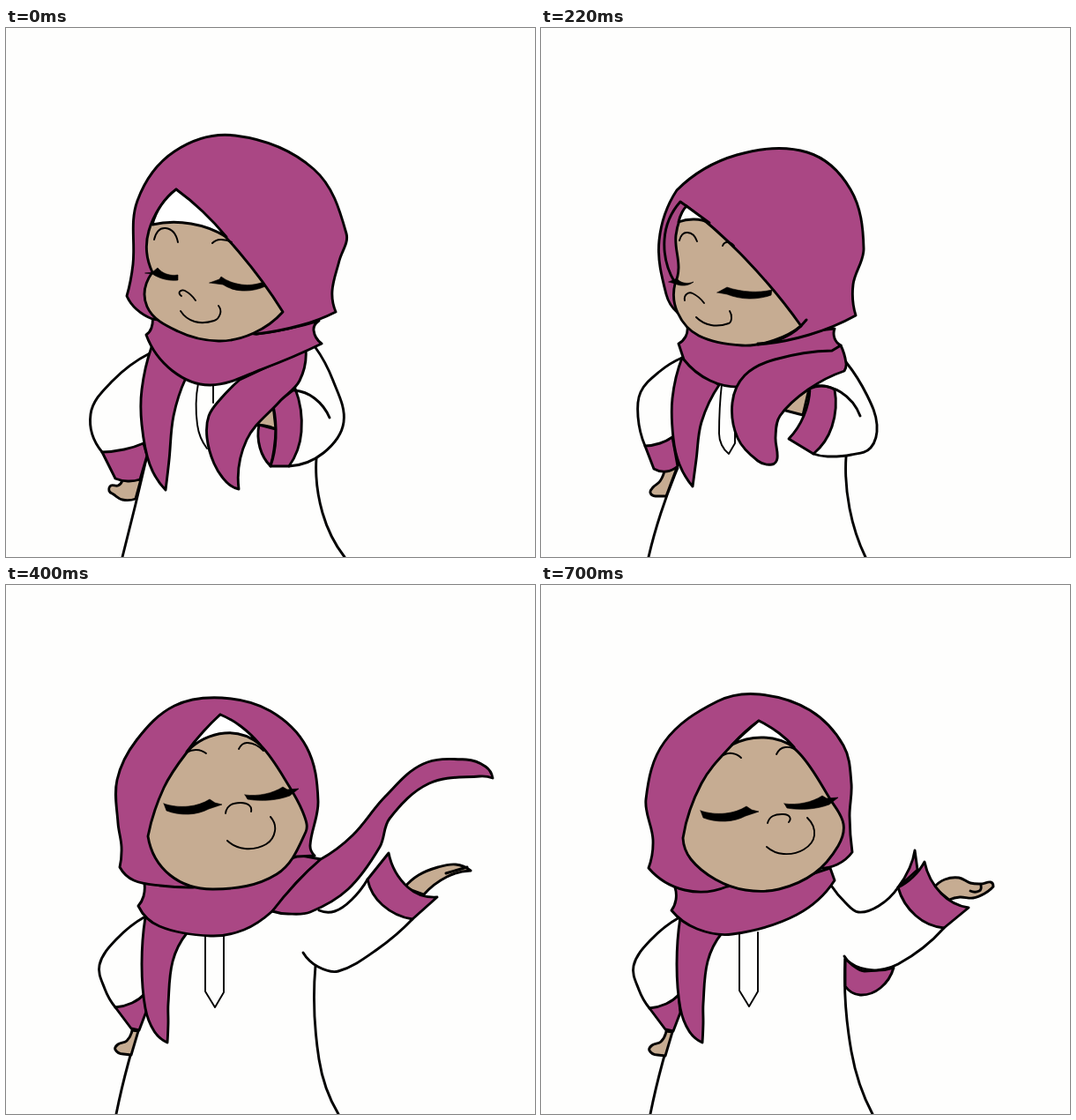
An HTML page that plays this animation: 600x600 px, repeating every 0.8 s.

```html
<!DOCTYPE html>
<html lang="en">
<head>
<meta charset="utf-8">
<title>Waving scarf</title>
<style>
html, body { margin: 0; width: 100%; height: 100%; overflow: hidden; background: #fefefd; }
svg { display: block; width: 100vw; height: 100vh; }
path { stroke: #000; stroke-width: 2.9; stroke-linejoin: round; stroke-linecap: round; fill: none; }
.cloth { fill: #aa4784; }
.skin { fill: #c6ac92; }
.white { fill: #fff; }
.fine { stroke-width: 1.9; }
.ink { fill: #000; stroke-width: .6; }
</style>
</head>
<body>
<svg id="stage" viewBox="0 0 600 600"></svg>
<script>
const NS = 'http://www.w3.org/2000/svg';
const stage = document.getElementById('stage');
let layer;

// Smooth curve through the points; "!" marks a corner.
function curve(text, closed, dx, dy) {
  const pts = text.split(' ').map(s => {
    const [x, y] = s.replace('!', '').split(',').map(Number);
    return { x: x + dx, y: y + dy, sharp: s.endsWith('!') };
  });
  const n = pts.length;
  if (!closed) pts[0].sharp = pts[n - 1].sharp = true;
  const handle = (i, len) => {
    const a = pts[(i + n - 1) % n], b = pts[(i + 1) % n], p = pts[i];
    const k = len * .35 / (Math.hypot(b.x - a.x, b.y - a.y) || 1);
    return { x: p.x + (b.x - a.x) * k, y: p.y + (b.y - a.y) * k };
  };
  let d = `M${pts[0].x} ${pts[0].y}`;
  for (let i = 0; i < (closed ? n : n - 1); i++) {
    const j = (i + 1) % n, p = pts[i], q = pts[j];
    const vx = q.x - p.x, vy = q.y - p.y, len = Math.hypot(vx, vy);
    let c1 = p.sharp ? null : handle(i, len);
    let c2 = q.sharp ? null : handle(j, -len);
    if (!c1 && !c2) { d += `L${q.x} ${q.y}`; continue; }
    c1 = c1 || { x: c2.x - vx / 3, y: c2.y - vy / 3 };
    c2 = c2 || { x: c1.x + vx / 3, y: c1.y + vy / 3 };
    d += `C${c1.x} ${c1.y} ${c2.x} ${c2.y} ${q.x} ${q.y}`;
  }
  return closed ? d + 'Z' : d;
}

const pen = (kind, closed) => (text, dx = 0, dy = 0) => {
  const path = document.createElementNS(NS, 'path');
  path.setAttribute('class', kind);
  path.setAttribute('d', curve(text, closed, dx, dy));
  layer.appendChild(path);
};
const cloth = pen('cloth', true), skin = pen('skin', true), white = pen('white', true);
const ink = pen('ink', true), line = pen('line', false), fine = pen('fine', false);

function bow() {
  line('160,485 147,540 132,600');
  line('352,488 359,550 384,600');
  skin('132,513! 127,519 119,519 117,525 122,529 132,535 147,534! 153,512!');
  cloth('109,481! 134,478 156,471! 160,485! 152,512! 138,514 124,511!');
  line('163,369 120,401 96,438 109,481');
  fine('218,403 217,450 228,477');
  fine('235,404 235,425');
  skin('280,451! 303,428! 306,455! 293,451');
  cloth('287,450! 306,455! 304,478 300,497! 288,476');
  cloth('303,428! 306,465 300,497! 321,497! 335,458 328,409!');
  line('350,361 371,400 383,447 360,482 321,497');
  line('327,411 350,420 367,442');
  cloth('165,362! 154,410 154,450 163,495 181,524! 185,490 190,440 204,397!');
  cloth('340,364! 333,400 310,424 273,467 264,523! 250,515 236,494 228,465 230,440 244,420 265,399!');
  cloth('166,326! 165,340 159,348! 189,389 232,405 290,387 358,358! 349,343 355,332! 320,341 284,347! 200,340!');
  cloth('137,304! 144,268 149,196 191,140 260,122 349,160 386,233 378,264 370,298 374,322! 335,337 284,347! 166,330! 148,319');
  skin('193,183! 259,248 314,322! 281,346 241,355 195,344 160,316 166,277! 162,230');
  white('193,183! 223,208 250,237! 210,222 166,223! 176,201');
  fine('168,240 181,227 195,243');
  fine('234,244 243,240 256,243');
  ink('158,278! 166,277! 172,272! 182,279 195,280! 195,286! 180,285 166,279!');
  ink('231,289! 242,285! 244,282! 267,291 292,288! 294,293! 268,298 246,291!');
  fine('199,304 197,299 203,298 215,309');
  fine('198,321 214,333 236,332 243,324 241,315');
}

function lean() {
  line('155,499 136,550 122,600');
  line('346,486 350,545 368,600');
  skin('140,502! 135,514 127,521 124,527 130,531! 142,531! 154,499!');
  cloth('118,474! 135,471 149,464! 155,497! 142,503 128,500!');
  line('160,374 134,390 113,413 110,441 118,474');
  fine('205,404 202,460 205,473 213,483! 220,471! 220,440');
  skin('274,433! 287,417 304,409! 297,439!');
  cloth('305,409! 298,440 281,466! 309,483! 330,452 333,410! 319,406');
  line('309,483 325,486 352,484 374,476 381,450 370,417 346,379');
  line('308,406 340,413 362,440');
  cloth('160,374! 149,420 150,465 157,495 172,520! 176,490 182,447 202,405!');
  cloth('166,339! 164,350 156,358! 162,376! 192,400 228,407! 330,368! 340,360! 333,352 333,341! 250,350!');
  cloth('340,360! 346,380 344,389! 303,410 271,440 266,464 268,488 262,495 246,491 223,465 217,425 231,394 265,376 330,366!');
  cloth('154,184! 222,144 302,141 351,183 366,250 354,291 357,326! 304,348 246,359! 155,323! 142,302 134,241');
  skin('165,202! 232,262 295,338! 265,354 228,360 179,349 155,323 152,290! 156,272 153,235');
  white('165,202! 191,221! 174,217 156,220! 160,209');
  line('165,202 158,197! 140,240 152,289');
  line('246,358 276,351 301,331');
  fine('157,241 166,232 177,242');
  fine('206,247 211,243 219,247');
  ink('145,288! 154,284! 162,289 173,288! 163,292 152,290!');
  ink('200,300! 211,294! 237,299 262,297! 261,303! 236,307 211,302!');
  fine('163,309 165,302 172,301 185,312');
  fine('176,328 193,337 213,335 216,329 214,321');
}

// Parts that barely move once she stands upright.
function side(dx, dy) {
  line('157,482 139,541 125,600', dx);
  skin('143,505! 137,517 127,521 124,527 133,532! 142,533! 150,506!', dx, dy);
  cloth('124,479! 143,474 157,464! 159,484! 151,505! 142,503!', dx, dy);
  line('158,376 125,402 106,431 112,458 124,479', dx, dy);
}
const placket = (dx, dy) => fine('226,398 226,462! 237,480! 247,463! 247,396', dx, dy);
const longEnd = () => cloth('158,377! 154,430 158,480 168,506 183,519! 184,497 184,475 189,427 205,395!');
const leftEye = (dx, dy) => ink('177,250! 205,253 229,245! 235,249! 243,251! 228,256! 205,262 180,258!', dx, dy);
const rightEye = (dx, dy) => ink('272,240! 295,239 315,231! 320,234! 333,233! 323,241! 300,246 275,245!', dx, dy);

function toss() {
  side(1, 0);
  line('348,487 357,548 375,600');
  placket(0, 0);
  skin('357,396! 358,382 369,373 385,366 408,361 423,368! 400,376 380,399!');
  line('369,375 380,373 385,366');
  line('391,371 403,365 418,367');
  cloth('324,382! 321,400 321,420! 355,437 392,433! 395,399! 356,397');
  line('321,420 333,470 354,489 379,473 392,433');
  cloth('159,377! 155,430 159,485 166,506 178,518! 181,488 187,440 204,397!');
  cloth('158,341! 158,354 151,363! 184,391 232,399 266,392 296,376 321,344 350,320! 330,309!');
  cloth('296,374! 320,341 350,318! 395,284 455,243 484,241 502,255 497,261! 451,276 410,320 379,363 330,384 312,381');
  cloth('126,326! 129,298 128,271 123,223 141,178 188,140 250,128 308,147 343,192 355,250 349,298 351,311! 346,318! 330,309! 199,340! 161,338');
  skin('239,155! 284,182 324,232 339,266 337,291 310,331 258,350 191,334 167,309 159,277! 177,232 205,191');
  white('239,155! 264,165 287,181! 252,171 217,180! 229,168');
  fine('206,191 217,188 228,193');
  fine('264,191 271,180 289,184');
  leftEye(0, 0);
  rightEye(0, 0);
  fine('247,264 253,253 273,251 279,257 275,265');
  fine('243,286 260,300 288,299 306,281 302,264');
}

function reach() {
  side(0, 0);
  line('351,432 355,538 377,600');
  placket(0, -1);
  skin('452,343! 468,329 490,320 510,317 527,324! 500,331 474,351!');
  line('499,327 523,320');
  cloth('434,304! 456,343 489,354! 461,379! 427,363 410,334!');
  line('337,417 354,433 377,438 420,414 461,379');
  line('410,334 392,357 373,370 355,369');
  longEnd();
  cloth('157,339! 156,353 150,364! 174,387 232,398 270,391 302,370 329,338 357,311! 330,306!');
  cloth('302,370! 329,338 357,311! 393,284 430,240 473,203 522,198 544,206 552,219! 537,217 480,225 435,265 424,297 388,345 345,371 320,373');
  cloth('129,320! 131,297 127,270 126,221 148,176 191,137 245,128 300,143 341,184 354,245 345,295 350,307! 330,308! 212,343! 175,341 145,335');
  skin('243,147! 289,182 321,228 338,261 340,280 307,328 235,345 186,329 161,285! 179,230 205,190');
  white('243,147! 266,160 288,181! 248,168 205,189! 224,166');
  fine('205,190 216,187 227,191');
  fine('264,186 274,179 292,188');
  leftEye(2, -2);
  rightEye(-1, -2);
  fine('249,259 254,250 266,247 276,250 278,257');
  fine('251,290 271,299 295,294 305,279 300,263');
}

function settle(neckEnd, hoodEnd) {
  side(-1, 1);
  line('345,424 352,529 376,600');
  placket(-1, -2);
  skin('446,343! 458,334 474,332 487,338 500,339 510,337 513,342! 503,350 490,355 475,354 463,357!');
  line('487,347 497,347 499,341');
  cloth('435,314! 454,350 485,366! 457,389! 425,375 405,343! 422,331');
  line('344,421 353,431 367,438 405,430 457,389');
  longEnd();
  cloth('152,343! 153,357 148,369! 177,390 217,396 ' + neckEnd);
  cloth('122,321! 127,289 119,243 140,178 200,132 248,124 305,142 343,182 352,225 350,262 353,303! ' + hoodEnd + ' 211,342! 163,346');
  skin('247,154! 294,192 328,243 343,271 337,296 310,327 270,345 232,346 198,334 170,311 161,287! 182,225 217,181');
  white('247,154! 270,168 287,184! 253,173 217,181! 232,167');
  fine('207,193 217,191 227,196');
  fine('267,192 277,184 291,189');
  leftEye(4, 6);
  rightEye(4, 8);
  fine('257,270 263,262 275,260 282,263 281,269');
  fine('256,297 275,305 298,300 310,284 302,264');
}
const lowNeck = () => settle('290,374 333,335! 328,321! 270,340!', '336,317 315,321!');

function flick() {
  line('336,354 346,366 360,371 383,364 405,345');
  cloth('320,351! 335,336 353,318! 397,307 430,270 471,214 507,189 524,188 538,193! 517,195 476,230 440,292 428,323 405,345 366,358');
  settle('275,382 320,351 353,318! 345,320! 333,304!', '339,314! 333,304!');
}

function drop() {
  cloth('328,333! 360,348 395,343 420,298 445,235 460,217 474,213! 451,254 442,300 444,340! 435,315! 405,343! 382,363 355,370 340,359 328,346!');
  lowNeck();
}

function rest() {
  cloth('405,343! 418,321 424,301! 427,323!');
  cloth('345,424! 369,436 400,434! 385,457 362,465 345,455!');
  line('330,342 345,360 360,371 383,364 405,343');
  lowNeck();
}

const groups = [bow, lean, toss, reach, flick, drop, rest].map(draw => {
  layer = stage.appendChild(document.createElementNS(NS, 'g'));
  draw();
  return layer;
});

// Each pose holds one beat, the second one two.
const BEAT = 100, BEATS = 8;
function show(ms) {
  const beat = Math.floor(ms / BEAT) % BEATS;
  const now = beat < 2 ? beat : beat - 1;
  groups.forEach((g, i) => { g.style.display = i === now ? '' : 'none'; });
}

const begin = performance.now();
function tick() {
  show(performance.now() - begin);
  requestAnimationFrame(tick);
}
tick();
</script>
</body>
</html>
```
